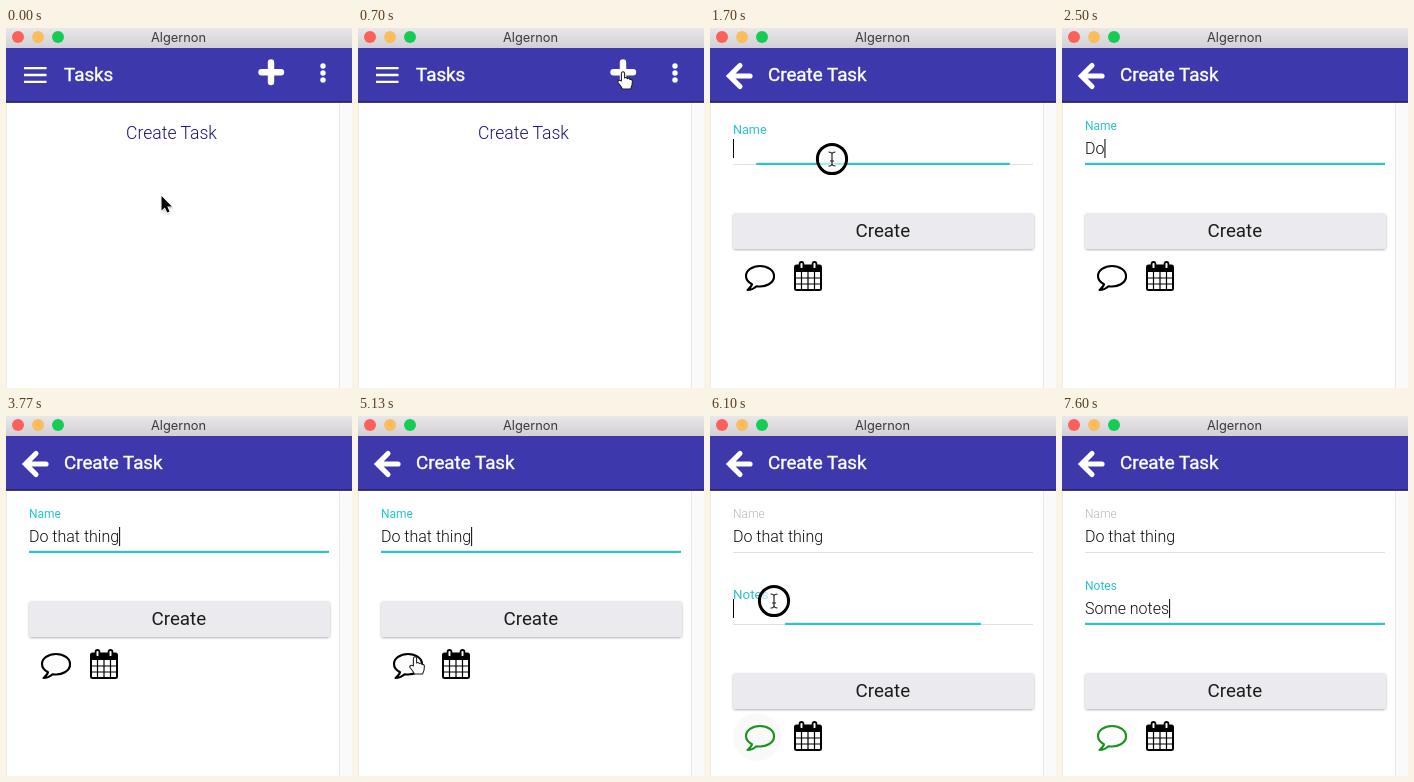
An HTML page that plays this animation: 346 by 360 pixels, repeating every 8000 ms.

```html
<!DOCTYPE html>
<html lang="en">
<head>
<meta charset="utf-8">
<title>Task window</title>
<style>
  html, body { margin: 0; width: 100%; height: 100%; overflow: hidden; background: #fff; }
  svg { display: block; width: 346px; height: 360px; }
  text { font-family: Roboto, sans-serif; white-space: pre; }
  .heading { font-size: 18.8px; fill: #fff; stroke: #fff; stroke-width: .4px; }
  .value { font-size: 16px; font-weight: 300; fill: #111; }
  .line { fill: none; stroke: currentColor; }
</style>
</head>
<body>
<svg viewBox="0 0 346 360">
  <defs>
    <linearGradient id="chrome" x2="0" y2="1">
      <stop stop-color="#e9e7e9"/><stop offset="1" stop-color="#d2d0d2"/>
    </linearGradient>
    <filter id="shadow" x="-10%" y="-20%" width="120%" height="150%">
      <feDropShadow dx="0" dy="1" stdDeviation="1.2" flood-opacity=".3"/>
    </filter>
  </defs>

  <rect width="346" height="360" fill="#fff"/>
  <rect x="333" y="75" width="13" height="285" fill="#fafafa"/>
  <path d="M333.5 75V360" stroke="#e7e7e7"/>
  <path d="M.5 75V360" stroke="#ededed"/>

  <rect width="346" height="20" fill="url(#chrome)"/>
  <circle cx="12" cy="9" r="6" fill="#fc605b"/>
  <circle cx="32" cy="9" r="6" fill="#fdbc5e"/>
  <circle cx="52" cy="9" r="6" fill="#16cb56"/>
  <text x="145" y="14" style="font: 12.8px Inter, sans-serif" fill="#3c3a3c">Algernon</text>
  <rect y="20" width="346" height="54" fill="#3d39ad"/>
  <rect y="73.5" width="346" height="1.3" fill="#17153f"/>

  <g id="listPage">
    <path d="M18 40.2H40.5M18 47H40.5M18 53.8H40.5" stroke="#fff" stroke-width="2.3"/>
    <text class="heading" x="58" y="52.5">Tasks</text>
    <path d="M265 34.5V54M255.5 44.2H275" stroke="#fff" stroke-width="6.4" stroke-linecap="round"/>
    <g fill="#fff"><circle cx="317" cy="38" r="2.7"/><circle cx="317" cy="45" r="2.7"/><circle cx="317" cy="52" r="2.7"/></g>
    <text x="120" y="111" font-size="17.6" font-weight="300" fill="#1a1780">Create Task</text>
  </g>

  <g id="formPage">
    <path d="M30 37.5L19.5 48L30 58.5M20 48H40" fill="none" stroke="#fff" stroke-width="5.2" stroke-linecap="round"/>
    <text class="heading" x="58" y="52.5">Create Task</text>
    <g id="fields"></g>
    <g id="actions">
      <rect x="23" y="185" width="301" height="36" rx="3" fill="#ebebef" filter="url(#shadow)"/>
      <text x="145.5" y="209" font-size="18.8" fill="#1c1c1c">Create</text>
      <circle id="ripple" cx="47" cy="249" r="24"/>
      <path id="bubble" class="line" stroke-width="2.1" stroke-linejoin="round"
        d="M46.5 258.2C44 260.5 41 262 37.5 262C40.5 259.5 41.6 258 42 256.2C38 254.2 36 251.5 36 248A14 10 0 0 1 64 248A14 10 0 0 1 46.5 258.2Z"/>
      <g id="calendar">
        <rect x="85" y="237.5" width="26" height="24.5" rx="1.5" class="line" stroke-width="2"/>
        <path d="M85 237H111V244H85Z"/>
        <path class="line" stroke-width="1.2" d="M91.5 244V262M98 244V262M104.5 244V262M85 250H111M85 256H111"/>
        <g fill="#fff" stroke="#000" stroke-width="1.8">
          <rect x="89.6" y="234" width="3.8" height="7" rx="1.8"/><rect x="102.6" y="234" width="3.8" height="7" rx="1.8"/>
        </g>
      </g>
    </g>
  </g>

  <g id="pointer">
    <circle id="ring" r="14.6" fill="#fff" fill-opacity=".6" stroke="#000" stroke-width="3"/>
    <path id="arrow" d="M0 0V14.5L3.4 11.4L5.7 16.5L8 15.5L5.8 10.4H10.4Z" stroke="#fff" stroke-width="1.2" paint-order="stroke" filter="url(#shadow)"/>
    <g id="beam" fill="none">
      <path id="beamShape" d="M-3.5 -7Q0 -7 0 -4.5Q0 -7 3.5 -7M0 -5V5M-3.5 7Q0 7 0 4.5Q0 7 3.5 7M-2 2H2" stroke="#fff" stroke-width="2.6"/>
      <use href="#beamShape"/>
      <path d="M-3.5 -7Q0 -7 0 -4.5Q0 -7 3.5 -7M0 -5V5M-3.5 7Q0 7 0 4.5Q0 7 3.5 7M-2 2H2" stroke="#222" stroke-width="1.2"/>
    </g>
    <path id="hand" fill="#fff" stroke="#222" stroke-width="1.1" stroke-linejoin="round"
      d="M-1.6 9V1Q0 -1.4 1.6 1V6Q3.2 4.8 4.4 6.6Q6 5.6 7 7.4Q9.4 7 9.4 9.5Q9.6 13 7.6 17H-.6Q-2 14 -5.4 10Q-4.6 7.2 -1.6 9Z"/>
  </g>
</svg>
<script>
const LOOP = 8000, TEAL = '#2bc4c8', GREY = '#b8b8b8';
const $ = id => document.getElementById(id);
const clamp = v => Math.max(0, Math.min(1, v));
const mix = (a, b, p) => a + (b - a) * p;
const smooth = p => p * p * (3 - 2 * p);
const show = (el, on) => el.style.display = on ? '' : 'none';
const set = (el, attrs) => { for (const k in attrs) el.setAttribute(k, attrs[k]); };

// Material curve: cubic-bezier(.4, 0, .2, 1)
function material(p) {
  let low = 0, high = 1;
  for (let i = 0; i < 20; i++) {
    const u = (low + high) / 2, v = 1 - u;
    if (1.2 * v * v * u + .6 * v * u * u + u ** 3 < p) low = u; else high = u;
  }
  return low * low * (3 - 2 * low);
}

const OPEN_FORM = 890, ADD_NOTES = 5340;
const fields = [
  { name: 'Name', text: 'Do that thing', dy: 0, from: OPEN_FORM, focus: 1560, blur: 5300,
    keys: [2270, 2500, 2570, 2730, 2870, 2930, 3030, 3170, 3230, 3330, 3430, 3600, 3770] },
  { name: 'Notes', text: 'Some notes', dy: 72, from: ADD_NOTES, focus: 5996, blur: LOOP,
    keys: [6570, 6830, 6900, 7030, 7130, 7330, 7400, 7470, 7530, 7600] }
];
for (const f of fields) {
  $('fields').insertAdjacentHTML('beforeend', `<g transform="translate(0 ${f.dy})">
    <text x="23">${f.name}</text><text class="value" x="23" y="126"></text>
    <rect x="23" y="136" width="300" height="1" fill="#e0e0e0"/>
    <rect y="134.8" height="2.2" fill="${TEAL}"/><rect y="111" width="1" height="19"/></g>`);
  f.group = $('fields').lastElementChild;
  [f.label, f.value, , f.bar, f.caret] = f.group.children;
}

function drawField(f, t) {
  show(f.group, t >= f.from);
  const focused = t >= f.focus && t < f.blur;
  const p = material(clamp((t - f.focus) / 250));
  set(f.label, { y: mix(127, 102, p), 'font-size': mix(16, 12, p),
    'font-weight': focused ? 400 : 300, fill: focused ? TEAL : GREY });
  const typed = f.keys.filter(k => k <= t);
  f.value.textContent = f.text.slice(0, typed.length);
  set(f.bar, { x: 173 - 150 * p, width: 300 * p });
  show(f.bar, focused);
  const sinceKey = t - (typed.pop() ?? f.focus);
  set(f.caret, { x: 23 + (typed.length || f.value.textContent ? f.value.getComputedTextLength() : 0) });
  show(f.caret, focused && Math.floor(sinceKey / 515) % 2 === 0);
}

// Pointer stops: time, x, y
const path = [[20, 155.5, 168], [640, 265, 44], [880, 265, 44], [1120, 125.5, 131], [1170, 125.5, 131],
  [1500, 122, 131], [4290, 122, 131], [5080, 57, 241], [5430, 57, 241], [5930, 64, 185]];
const clicks = [[720, 880], [1560, 1780], [5230, 5400], [5980, 6200]];

function pointerAt(t) {
  const next = path.findIndex(s => s[0] > t);
  if (next === 0) return path[0].slice(1);
  if (next < 0) return path.at(-1).slice(1);
  const a = path[next - 1], b = path[next], p = smooth((t - a[0]) / (b[0] - a[0]));
  return [mix(a[1], b[1], p), mix(a[2], b[2], p)];
}

function pointerKind(t, x, y) {
  const within = (top, bottom) => y >= top && y < bottom;
  if (t < OPEN_FORM) return within(30, 60) && x > 250 ? 'hand' : 'arrow';
  const shift = t >= ADD_NOTES ? 72 : 0;
  if (within(108, 138) || shift && within(180, 210)) return 'beam';
  return within(185 + shift, 265 + shift) ? 'hand' : 'arrow';
}

function drawPointer(t) {
  const [x, y] = pointerAt(t), kind = pointerKind(t, x, y);
  set($('pointer'), { transform: `translate(${x} ${y})` });
  show($('pointer'), !(t >= 2270 && t < 4300) && t < 6570);
  for (const k of ['arrow', 'beam', 'hand']) show($(k), k === kind);
  show($('ring'), clicks.some(([down, up]) => t >= down && t < up));
}

function draw(t) {
  show($('listPage'), t < OPEN_FORM);
  show($('formPage'), t >= OPEN_FORM);
  fields.forEach(f => drawField(f, t));
  const added = t >= ADD_NOTES;
  set($('actions'), { transform: `translate(0 ${added ? 72 : 0})` });
  $('bubble').style.color = added ? '#18921f' : '#000';
  const age = t - 5300;
  set($('ripple'), { r: 24 * clamp(age / 250), opacity: age < 0 ? 0 : .12 * clamp(1 - age / 1000) });
  drawPointer(t);
}

function tick() {
  draw(performance.now() % LOOP);
  requestAnimationFrame(tick);
}
tick();
</script>
</body>
</html>
```
